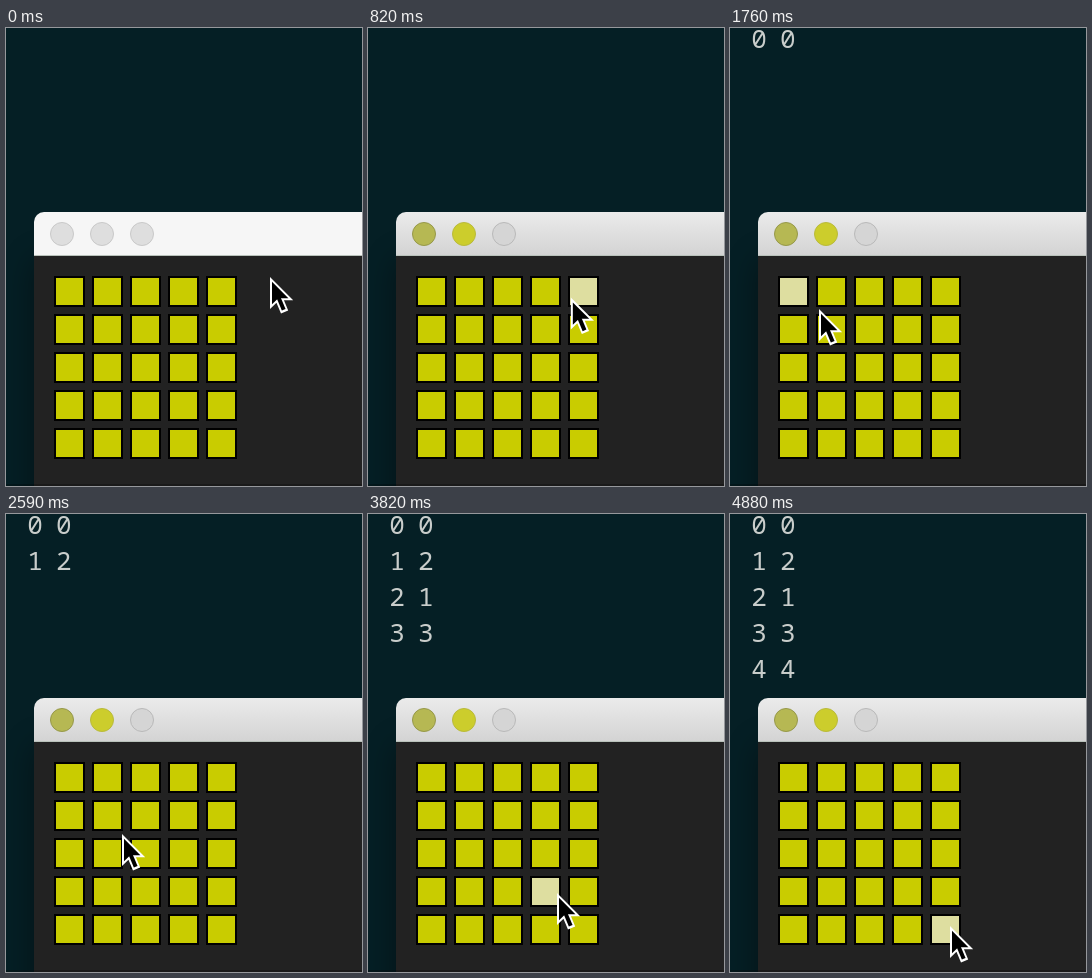
An HTML page that plays this animation: 356x458 px, repeating every 6.76 s.

```html
<!DOCTYPE html>
<html lang="en">
<head>
<meta charset="utf-8">
<title>Button grid</title>
<style>
  html, body { margin: 0; width: 100%; height: 100%; overflow: hidden; background: #051f25; }
  svg { display: block; width: 356px; height: 458px; }
  #log text {
    font: 26px "Noto Sans Mono", "DejaVu Sans Mono", monospace;
    letter-spacing: -1.2px;
    fill: #c9cdcb;
    visibility: hidden;
  }
  #log .on { visibility: visible; }
  #bar { fill: url(#active); }
  .idle #bar { fill: #f6f6f6; }
  .light { stroke-width: 1; }
  .idle .light { fill: #dedede; stroke: #c9c9c9; }
  #grid rect { fill: #c9cc00; stroke: #000; stroke-width: 2; }
  #grid .hover { fill: #dedea0; }
</style>
</head>
<body>
<svg id="stage" viewBox="0 0 356 458">
  <defs>
    <linearGradient id="active" x2="0" y2="1">
      <stop stop-color="#ebebeb"/>
      <stop offset="1" stop-color="#d3d3d3"/>
    </linearGradient>
    <filter id="blur" x="-30%" y="-30%" width="160%" height="160%">
      <feGaussianBlur stdDeviation="16"/>
    </filter>
  </defs>
  <rect width="356" height="458" fill="#051f25"/>
  <g id="log"></g>
  <rect x="28" y="232" width="420" height="400" opacity=".4" filter="url(#blur)"/>
  <rect x="28" y="220" width="340" height="250" fill="#222"/>
  <path id="bar" d="M28 228V194a10 10 0 0 1 10-10H360V228Z"/>
  <rect x="28" y="227" width="328" height="1" fill="#b9c2bb"/>
  <circle class="light" cx="56" cy="206" r="11.5" fill="#b6b853" stroke="#96984a"/>
  <circle class="light" cx="96" cy="206" r="11.5" fill="#cccd2c" stroke="#b9ba3c"/>
  <circle class="light" cx="136" cy="206" r="11.5" fill="#d5d5d5" stroke="#b9b9b9"/>
  <g id="grid"></g>
  <rect y="456" width="356" height="2" opacity=".25"/>
  <g id="cursor">
    <g transform="scale(2) translate(-8.2 -4.9)">
      <path fill="#fff" d="M8.2 20.9V4.9L19.8 16.5H13L12.6 16.6ZM17.3 21.6L13.7 23.1L9 12L12.7 10.5Z"/>
      <path d="M9.2 7.3V18.5L12.2 15.6L12.6 15.5H17.4Z"/>
      <rect x="12.5" y="13.6" width="2" height="8" transform="matrix(.9221 -.3871 .3871 .9221 -5.7605 6.5909)"/>
    </g>
  </g>
</svg>
<script>
  const LOOP = 6760, TICK = 58, SIZE = 29, PITCH = 38, LEFT = 49, TOP = 249, SIDE = 5;
  const $ = id => document.getElementById(id);

  // Pointer moves; each starts where the one before ended.
  const moves = [
    { start: 0, end: 0, x: 264, y: 249 },
    { start: 590, end: 590, x: 253, y: 249 },
    { start: 650, end: 1120, x: 59.5, y: 264, bow: 23 },
    { start: 1760, end: 1760, x: 89, y: 281 },
    { start: 1820, end: 1880, x: 130, y: 297 },
    { start: 2530, end: 2530, x: 116, y: 320 },
    { start: 2650, end: 3000, x: 104, y: 346 },
    { start: 3350, end: 3410, x: 189, y: 379 },
    { start: 4060, end: 4240, x: 234, y: 418 },
    { start: 4470, end: 4590, x: 220, y: 412 }
  ];

  const clicks = [
    { press: 1290, release: 1470 },
    { press: 2180, release: 2350 },
    { press: 3180, release: 3290 },
    { press: 3710, release: 3820 },
    { press: 4710, release: 4880 }
  ];

  const ease = p => p * p * (3 - 2 * p);

  // The pointer advances in whole ticks.
  function pointer(t) {
    let x = 0, y = 0;
    for (const m of moves) {
      if (t < m.start) break;
      const count = Math.floor((m.end - m.start) / TICK) + 1;
      const step = Math.min(count, Math.floor((t - m.start) / TICK) + 1);
      const p = ease(step / count);
      x += (m.x - x) * p;
      y += (m.y - y) * p + (m.bow || 0) * Math.sin(Math.PI * p);
    }
    return [x, y];
  }

  function cellAt([x, y]) {
    const dx = x - LEFT, dy = y - TOP;
    const col = Math.floor(dx / PITCH), row = Math.floor(dy / PITCH);
    const inside = dx >= 0 && dy >= 0 && dx % PITCH < SIZE && dy % PITCH < SIZE;
    return inside && col < SIDE && row < SIDE ? row * SIDE + col : -1;
  }

  function add(parent, tag, attrs) {
    const el = document.createElementNS("http://www.w3.org/2000/svg", tag);
    for (const key in attrs) el.setAttribute(key, attrs[key]);
    return parent.appendChild(el);
  }

  const cells = Array.from({ length: SIDE * SIDE }, (_, i) => add($("grid"), "rect", {
    x: LEFT + PITCH * (i % SIDE), y: TOP + PITCH * Math.floor(i / SIDE),
    width: SIZE, height: SIZE
  }));

  // Every click prints the row and column under the pointer.
  const lines = clicks.map(({ press }, i) => {
    const cell = cellAt(pointer(press));
    const line = add($("log"), "text", { x: 21.2, y: 20 + 36 * i });
    line.textContent = Math.floor(cell / SIDE) + " " + cell % SIDE;
    return line;
  });

  function draw(t) {
    const pressed = clicks.some(c => t >= c.press && t < c.release);
    // Highlights trail the pointer by a tick.
    const hover = pressed ? -1 : cellAt(pointer(Math.max(0, t - TICK)));
    $("stage").classList.toggle("idle", t < 60);
    $("cursor").setAttribute("transform", `translate(${pointer(t)})`);
    cells.forEach((cell, i) => cell.classList.toggle("hover", i === hover));
    lines.forEach((line, i) => {
      const { press, release } = clicks[i];
      line.classList.toggle("on", t >= (press + release) / 2);
    });
  }

  const begin = performance.now();
  function frame() {
    draw((performance.now() - begin) % LOOP);
    requestAnimationFrame(frame);
  }
  frame();
</script>
</body>
</html>
```
